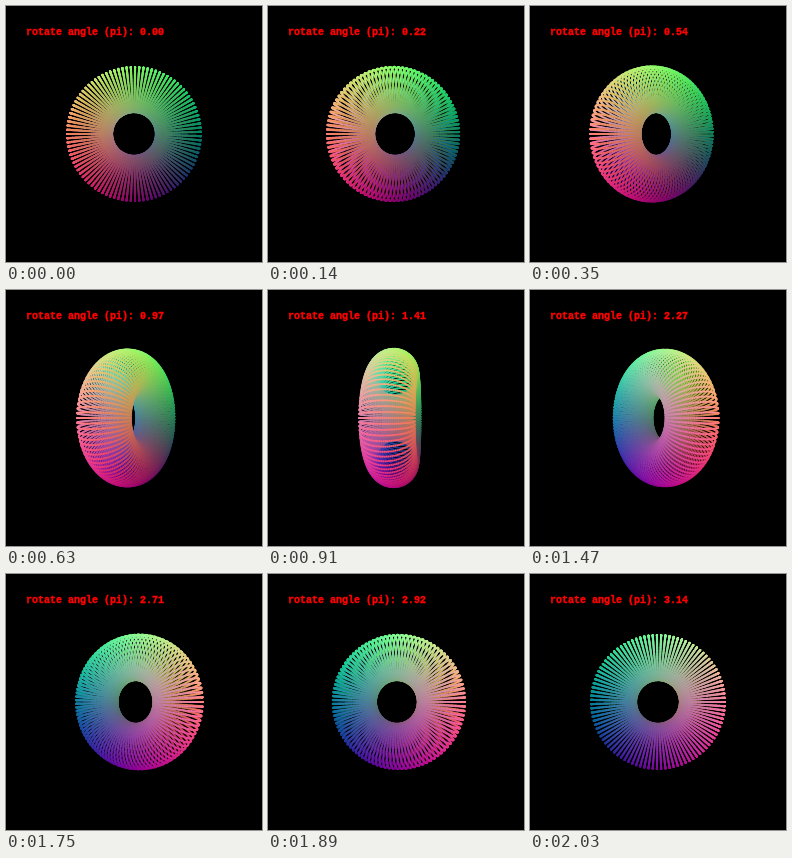
An HTML page with a canvas that plays this animation: 256x256 px, repeating every 2.1 s.

```html
<!DOCTYPE html>
<html>
<head>
<meta charset="utf-8">
<style>
html, body { margin: 0; width: 100%; height: 100%; overflow: hidden; background: #000; }
canvas { display: block; width: 256px; height: 256px; }
</style>
</head>
<body>
<canvas id="stage" width="256" height="256"></canvas>
<script>
const ctx = document.getElementById('stage').getContext('2d');
const STEPS = 30, STEP_MS = 70;
const RINGS = 99, DOTS = 99;
const MAJOR = 2, MINOR = 1, REACH = MAJOR + MINOR;
const DISTANCE = 10, FOCAL = 220, CENTER = 128, DOT_RADIUS = 1.1;

const channel = v => Math.round(255 * (v + REACH) / (2 * REACH));

// Torus points, coloured by their position in the torus's own space;
// x points left, y up and z away from the viewer at angle 0
const points = [];
for (let i = 0; i < RINGS; i++) {
  const phi = i / RINGS * 2 * Math.PI;
  for (let j = 0; j < DOTS; j++) {
    const theta = j / DOTS * 2 * Math.PI;
    const radius = MAJOR + MINOR * Math.cos(theta);
    const x = radius * Math.cos(phi), y = radius * Math.sin(phi), z = MINOR * Math.sin(theta);
    points.push({ x, y, z, color: `rgb(${channel(x)},${channel(y)},${channel(z)})` });
  }
}

function draw(angle) {
  const c = Math.cos(angle), s = Math.sin(angle);
  ctx.fillStyle = '#000';
  ctx.fillRect(0, 0, 256, 256);

  for (const p of points) p.depth = p.z * c - p.x * s;
  points.sort((a, b) => b.depth - a.depth);
  for (const p of points) {
    const scale = FOCAL / (DISTANCE + p.depth);
    ctx.fillStyle = p.color;
    ctx.beginPath();
    ctx.arc(CENTER - (p.x * c + p.z * s) * scale, CENTER - p.y * scale, DOT_RADIUS, 0, 2 * Math.PI);
    ctx.fill();
  }

  const label = `rotate angle (pi): ${angle.toFixed(2)}`;
  ctx.font = 'bold 10px "Liberation Mono", monospace';
  ctx.fillStyle = ctx.strokeStyle = '#f00';
  ctx.lineWidth = 0.4;
  ctx.fillText(label, 20, 29);
  ctx.strokeText(label, 20, 29);
}

const start = performance.now();
let shown = -1;
function tick() {
  const step = Math.floor(Math.max(0, performance.now() - start) / STEP_MS) % STEPS;
  if (step !== shown) draw(Math.PI * step / (STEPS - 1));
  shown = step;
  requestAnimationFrame(tick);
}
tick();
</script>
</body>
</html>
```
